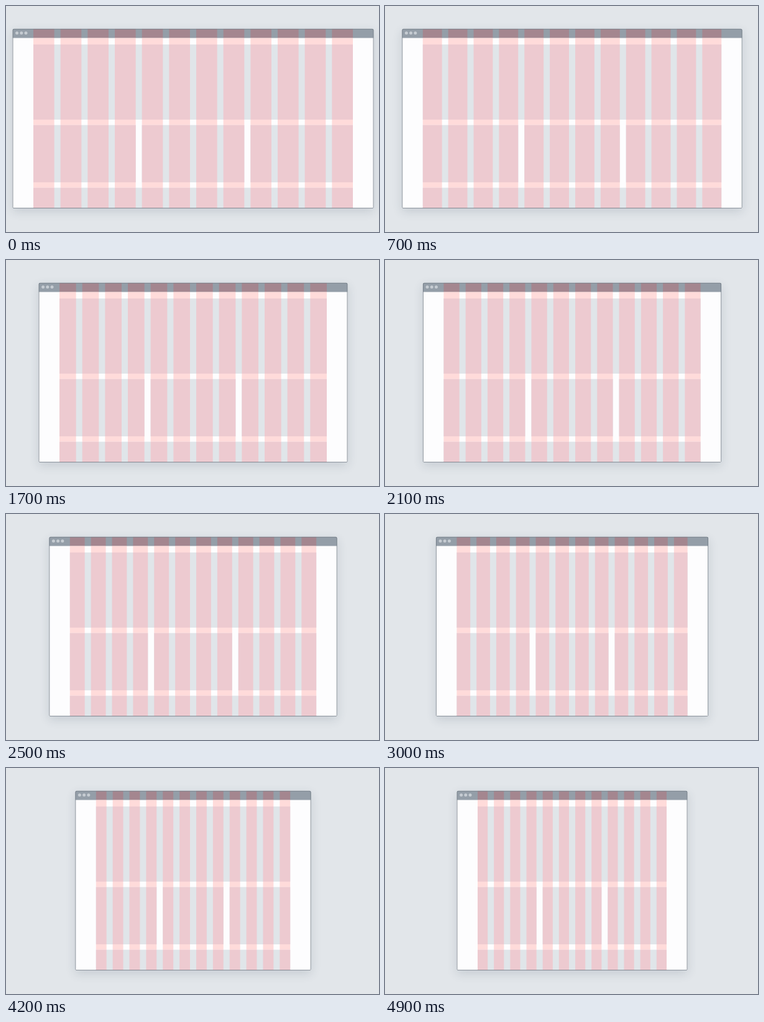
Write an HTML page with a canvas that moves like this. It is 600 px wide and 364 px high and loops after 5.5 s.

```html
<!DOCTYPE html>
<html lang="en">
<head>
<meta charset="utf-8">
<title>Responsive grid</title>
<style>
  html, body { margin: 0; height: 100%; overflow: hidden; background: #e2e6ea; }
  canvas { display: block; }
</style>
</head>
<body>
<canvas id="stage" width="600" height="364"></canvas>
<script>
const ctx = document.getElementById('stage').getContext('2d');
const LOOP = 5500, TICK = 100;
const CENTER = 301, HALF = 290.5, STEP = 4.2;
const TOP = 36.7, BAR = 51.5, BOTTOM = 326;
const INSET = 33.5, GAP = 10, COLS = 12;
const BLOCK = '#e0e5e9', PINK_BAR = '#a4868f', PINK_GAP = '#ffdbda', PINK_BLOCK = '#edcad0';

// Ticks at which the window narrows by one step
const JUMPS = [1, 3, 5, 6, 8, 10, 12, 13, 15, 17, 19, 21, 23,
  25, 27, 28, 30, 32, 33, 35, 37, 39, 40, 42, 44];

// Rows of the page: top, bottom, column tint
const ROWS = [
  [TOP, BAR, PINK_BAR],
  [BAR, 62, PINK_GAP],
  [62, 183, PINK_BLOCK],
  [183, 191.7, PINK_GAP],
  [191.7, 284, PINK_BLOCK],
  [284, 292.7, PINK_GAP],
  [292.7, BOTTOM, PINK_BLOCK]
];

function box(x1, y1, x2, y2, color) {
  ctx.fillStyle = color;
  ctx.fillRect(x1, y1, x2 - x1, y2 - y1);
}

function frame(left, right) {
  ctx.beginPath();
  ctx.roundRect(left, TOP, right - left, BOTTOM - TOP, [2, 2, 1, 1]);
}

function drawWindow(half) {
  const left = CENTER - half, right = CENTER + half;
  const x0 = left + INSET, x1 = right - INSET;
  const col = (x1 - x0 - GAP * (COLS - 1)) / COLS;
  const colX = i => x0 + i * (col + GAP);

  ctx.save();
  ctx.shadowColor = 'rgba(50, 70, 90, 0.16)';
  ctx.shadowBlur = 16;
  ctx.shadowOffsetY = 5;
  ctx.fillStyle = '#fdfdfe';
  frame(left, right);
  ctx.fill();
  ctx.restore();

  ctx.save();
  frame(left, right);
  ctx.clip();
  box(left, TOP, right, BAR, '#949ea8');
  box(x0, 62, x1, 183, BLOCK);
  for (let i = 0; i < COLS; i += 4) box(colX(i), 191.7, colX(i + 3) + col, 284, BLOCK);
  box(x0, 292.7, x1, BOTTOM, BLOCK);

  for (let i = 0; i < COLS; i++) {
    for (const [y1, y2, tint] of ROWS) box(colX(i), y1, colX(i) + col, y2, tint);
  }

  ctx.fillStyle = '#c6ccd2';
  for (let i = 0; i < 3; i++) {
    ctx.beginPath();
    ctx.arc(left + 7.1 + i * 7.2, 43.6, 2.5, 0, Math.PI * 2);
    ctx.fill();
  }
  ctx.restore();

  ctx.strokeStyle = 'rgba(110, 120, 131, 0.8)';
  ctx.lineWidth = 1;
  ctx.beginPath();
  ctx.roundRect(left + 0.5, TOP + 0.5, right - left - 1, BOTTOM - TOP - 1, [2, 2, 1, 1]);
  ctx.stroke();
}

function draw(now) {
  const tick = Math.floor(now % LOOP / TICK);
  const steps = JUMPS.filter(j => j <= tick).length;
  box(0, 0, 600, 364, '#e2e6ea');
  drawWindow(HALF - steps * STEP);
  requestAnimationFrame(draw);
}

const start = performance.now();
(function run() {
  draw(0);
})();
</script>
</body>
</html>
```
